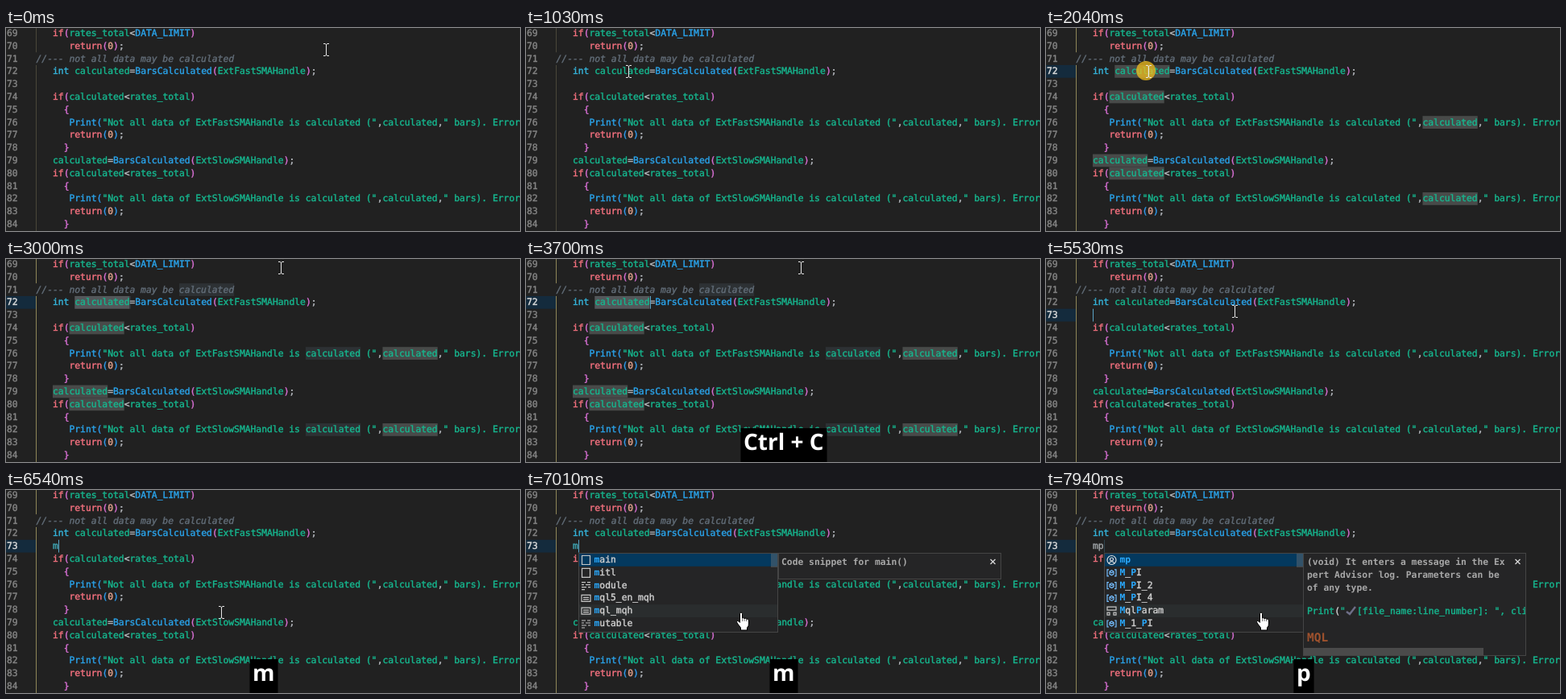
An HTML page with a canvas that plays this animation: 638x252 px, repeating every 8000 ms.

```html
<!DOCTYPE html>
<html lang="en">
<head>
<meta charset="utf-8">
<title>Code editor</title>
<style>
html, body { margin: 0; width: 100%; height: 100%; overflow: hidden; background: #212121; }
canvas { display: block; }
</style>
</head>
<body>
<canvas id="stage" width="638" height="252"></canvas>
<script>
const ctx = document.getElementById('stage').getContext('2d');
const LOOP = 8000, CHAR = 6.825, ROW = 15.8, LEFT = 37.5, FIRST = 69;
const MONO = '11.34px "DejaVu Sans Mono", monospace';
const KEYS = 'bold 28px "Open Sans", sans-serif';
const BLUE = '#2aa3ea', TEAL = '#16b78f', GRAY = '#a8a8a8';
const BRACKETS = ['#ffd700', '#da70d6', '#2f9cf0'];

const source = `   if(rates_total<DATA_LIMIT)
      return(0);
//--- not all data may be calculated
   int calculated=BarsCalculated(ExtFastSMAHandle);

   if(calculated<rates_total)
     {
      Print("Not all data of ExtFastSMAHandle is calculated (",calculated," bars). Error "
      return(0);
     }
   calculated=BarsCalculated(ExtSlowSMAHandle);
   if(calculated<rates_total)
     {
      Print("Not all data of ExtSlowSMAHandle is calculated (",calculated," bars). Error "
      return(0);
     }`.split('\n');

const rules = [
  ['comment', /^\/\//, '#626d78'], ['string', /^"/, TEAL], ['keyword', /^(if|return)$/, '#f4717f'],
  ['type', /^int$/, '#35b5dc'], ['function', /^(BarsCalculated|Print|DATA_LIMIT)$/, BLUE],
  ['number', /^\d/, '#e0a08c'], ['name', /^\w/, TEAL], ['mark', /./, '#b9bdc2']
];

const lines = source.map(text => {
  let depth = 1;
  return [...text.matchAll(/\/\/.*|"[^"]*"|\w+|[^\s]/g)].map(({ 0: word, index: col }) => {
    const [kind, , base] = rules.find(rule => rule[1].test(word));
    let color = base;
    if (/^[({]$/.test(word)) color = BRACKETS[depth++ % 3];
    if (/^[)}]$/.test(word)) color = BRACKETS[Math.max(1, --depth) % 3];
    return { word, col, kind, color };
  });
});
// Statements inside braces sit one bracket level deeper.
[7, 8, 13, 14].forEach(i => lines[i].forEach(token => {
  if (/^[()]$/.test(token.word)) token.color = BRACKETS[2];
}));

const rowTop = i => -1.4 + ROW * i;
const colX = col => LEFT + col * CHAR;
const clamp = v => Math.min(1, Math.max(0, v));
const between = (t, a, b) => t >= a && t < b;

function box(x, y, w, h, fill, border) {
  ctx.fillStyle = fill;
  ctx.fillRect(x, y, w, h);
  if (border) {
    ctx.strokeStyle = border;
    ctx.lineWidth = 1;
    ctx.strokeRect(x + .5, y + .5, w - 1, h - 1);
  }
}

// Regular text gets a thin outline to reach a medium weight.
function label(text, x, y, color, font = MONO) {
  ctx.font = font;
  ctx.fillStyle = ctx.strokeStyle = color;
  ctx.fillText(text, x, y);
  if (font.startsWith('bold')) return;
  ctx.lineWidth = .4;
  ctx.strokeText(text, x, y);
}

function stroke(path, x, y, color, width = 1) {
  ctx.save();
  ctx.translate(x, y);
  ctx.strokeStyle = color;
  ctx.lineWidth = width;
  ctx.stroke(new Path2D(path));
  ctx.restore();
}

// Pointer stops: time, x, y
const stops = [
  [420, 397, 27], [1030, 127, 54], [2480, 127, 54], [2720, 341, 11], [4060, 341, 11],
  [4390, 254, 47], [4640, 234, 65], [5580, 234, 65], [6240, 267, 152]
];

function pointerAt(t) {
  const next = stops.findIndex(s => s[0] > t);
  if (next < 0) return stops[stops.length - 1].slice(1);
  if (next === 0) return stops[0].slice(1);
  const a = stops[next - 1], b = stops[next];
  const u = (t - a[0]) / (b[0] - a[0]), e = u * u * (3 - 2 * u);
  return [a[1] + (b[1] - a[1]) * e, a[2] + (b[2] - a[2]) * e];
}

// Caret moves: time, row, column
const carets = [[1430, 3, 13], [2250, 3, 17], [4930, 4, 3], [6540, 4, 4], [7210, 4, 5]];

function drawCaret(t) {
  const move = carets.filter(c => c[0] <= t).pop();
  if (!move) return;
  const age = t - move[0];
  let alpha = 1;
  if (age > 500) {
    const phase = (age - 500) % 1000, folded = phase < 500 ? phase : 1000 - phase;
    const u = clamp((folded - 100) / 200);
    alpha = 1 - u * u * (3 - 2 * u);
  }
  ctx.globalAlpha = alpha;
  box(Math.round(colX(move[2])), rowTop(move[1]), 1, ROW, '#5aa3c4');
  ctx.globalAlpha = 1;
}

function drawHighlights(t) {
  const symbols = between(t, 1700, 4990), matches = between(t, 2310, 4860);
  const selected = between(t, 2180, 4860);
  lines.forEach((tokens, row) => tokens.forEach(({ word, col, kind }) => {
    const at = word.indexOf('calculated');
    if (at < 0) return;
    const quoted = kind === 'string' || kind === 'comment';
    let fill = quoted ? matches && '#2d3134' : symbols && '#484a49';
    if (row === 3 && selected) fill = '#53575a';
    if (fill) box(colX(col + at), rowTop(row), 10 * CHAR, ROW, fill);
  }));
}

function drawGuide(active) {
  const color = active ? '#8f8658' : '#4a473a';
  box(37, 0, 1, rowTop(2), color);
  box(37, rowTop(3), 1, 252, color);
}

function drawEditor(t) {
  const active = t < 1430 ? -1 : t < 4800 ? 3 : 4;
  box(0, 0, 638, 252, '#212121');
  if (active >= 0) box(0, rowTop(active), 37, ROW, '#142b3d');
  drawGuide(active >= 0);
  drawHighlights(t);
  lines.forEach((tokens, row) => {
    const y = 10 + ROW * row;
    label(FIRST + row, 1, y, row === active ? '#e0e0e0' : '#858585');
    tokens.forEach(({ word, col, color, kind }) =>
      label(word, colX(col), y, color, kind === 'comment' ? 'italic ' + MONO : MONO));
  });
  if (t >= 6540) label(t < 7210 ? 'm' : 'mp', colX(3), 10 + ROW * 4, t < 7210 ? '#3fa7b4' : '#a0a5a8');
  drawCaret(t);
}

const icons = {
  snippet: ['M1.5 .5H11.5V11.5H1.5Z', '#c5c5c5'],
  word: ['M1 2H6M8 2H12M1 5H4M6 5H12M1 8H7M9 8H12M1 11H5', '#c5c5c5'],
  text: ['M1 2H12V10H1ZM3 5H10M3 7.5H10', '#c5c5c5'],
  user: ['M12 6A5.5 5.5 0 1 1 1 6A5.5 5.5 0 1 1 12 6M8.5 5A2 2 0 1 1 4.5 5A2 2 0 1 1 8.5 5M3 10Q6.5 5.5 10 10', '#e0e0e0'],
  constant: ['M3 2H1V10H3M10 2H12V10H10M4 4.5L6.5 3L9 4.5V7.5L6.5 9L4 7.5ZM4 4.5L6.5 6L9 4.5', '#75beff'],
  struct: ['M1 1H12V5H1ZM1 8H4V11H1ZM9 8H12V11H9Z', '#c5c5c5']
};
const listM = [['snippet', 'main'], ['snippet', 'mitl'], ['word', 'module'],
  ['text', 'mql5_en_mqh'], ['text', 'mql_mqh'], ['word', 'mutable']];
const listMp = [['user', 'mp'], ['constant', 'M_PI'], ['constant', 'M_PI_2'],
  ['constant', 'M_PI_4'], ['struct', 'MqlParam'], ['constant', 'M_1_PI']];

function drawList(x, items, typed) {
  box(x, 78, 248, 99, '#252526', '#454545');
  items.forEach(([icon, name], i) => {
    const y = 79 + ROW * i;
    if (i === 0) box(x + 1, y, 246, ROW, '#04395e');
    if (i === 4) box(x + 1, y, 246, ROW, '#2a2d2e');
    stroke(icons[icon][0], x + 3, y + 2, icons[icon][1], 1.2);
    let hit = 0;
    [...name].forEach((c, k) => {
      const match = c.toLowerCase() === typed[hit];
      if (match) hit++;
      label(c, x + 19.5 + k * CHAR, y + 11, match ? '#2aaaff' : '#d0d0d0', match ? 'bold ' + MONO : MONO);
    });
  });
  box(x + 239, 79, 8, 17, 'rgba(121, 121, 121, .4)');
}

function drawDetails(x, height) {
  box(x, 78, 277, height, '#252526', '#454545');
  stroke('M-3 -3L3 3M3 -3L-3 3', x + 266.5, 89, '#d8d8d8', 1.3);
}

function drawSuggestions(t) {
  if (t < 6610) return;
  if (t < 7270) {
    drawList(65, listM, 'm');
    if (t >= 7010) {
      drawDetails(313, 33);
      label('Code snippet for main()', 317, 93, GRAY, 'bold ' + MONO);
    }
    return;
  }
  drawList(72, listMp, 'mp');
  if (t < 7340) return;
  drawDetails(319, 128);
  ['(void) It enters a message in the Ex', 'pert Advisor log. Parameters can be', 'of any type.']
    .forEach((text, i) => label(text, 324, 93 + ROW * i, GRAY, 'bold ' + MONO));
  ctx.save();
  ctx.beginPath();
  ctx.rect(320, 79, 275, 126);
  ctx.clip();
  label('Print', 324, 154, TEAL);
  label('(', 324 + 5 * CHAR, 154, '#d0d0d0');
  label('"', 324 + 6 * CHAR, 154, TEAL);
  stroke('M0 4L4 7L11 -2', 373, 147, '#6f6f88', 2.4);
  label('[file_name:line_number]: ", client', 386, 154, TEAL);
  label('MQL', 324, 188, '#a0522d', 'bold 14.5px "DejaVu Sans Mono", monospace');
  ctx.restore();
  box(320, 196, 223, 9, '#4a4a4a');
}

function drawKeys(t) {
  const keys = between(t, 3210, 4200) ? ['Ctrl + C']
    : between(t, 6540, 7210) ? ['m'] : between(t, 7210, 7540) ? ['m', 'p'] : t >= 7540 ? ['p'] : [];
  ctx.font = KEYS;
  const widths = keys.map(key => ctx.measureText(key).width + 7.5);
  let x = 320 - (widths.reduce((a, b) => a + b, 0) + 9 * (keys.length - 1)) / 2;
  keys.forEach((key, i) => {
    box(x, 210, widths[i], 42, '#000');
    label(key, x + 3.5, 237, '#fff', KEYS);
    x += widths[i] + 9;
  });
}

const beam = 'M-3.5 -7.5H-1.5L0 -6.5L1.5 -7.5H3.5M0 -6.5V6.5M-3.5 7.5H-1.5L0 6.5L1.5 7.5H3.5';
const hand = new Path2D('M4 1.5Q4 0 5.5 0Q7 0 7 1.5V7Q8 6 9.5 7.5Q11 6.5 12 8.3Q14.5 7.5 15 10V14Q15 17 13 19V22H5V19L.5 13Q-.5 11 1 10.5Q2.5 10.5 4 12.5Z');
const clicks = [[1430, 1500], [2040, 2110], [2180, 2250], [4730, 4800]];

function drawPointer(t) {
  const [x, y] = pointerAt(t);
  if (clicks.some(([a, b]) => between(t, a, b))) {
    ctx.fillStyle = 'rgba(240, 190, 30, .75)';
    ctx.beginPath();
    ctx.arc(x - 3, y - 1, 12, 0, 7);
    ctx.fill();
  }
  if (t < 6610) {
    stroke(beam, Math.floor(x) + .5, Math.round(y), '#e8e8e8');
    return;
  }
  ctx.save();
  ctx.translate(261.5, 152);
  ctx.fillStyle = '#fff';
  ctx.strokeStyle = '#000';
  ctx.lineWidth = 1;
  ctx.fill(hand);
  ctx.stroke(hand);
  ctx.restore();
  stroke('M7 7V11M9.5 8V11M12 9V11', 261.5, 152, '#333', .7);
}

function frame(now) {
  const t = now % LOOP;
  ctx.textRendering = 'geometricPrecision';
  drawEditor(t);
  drawSuggestions(t);
  drawKeys(t);
  drawPointer(t);
  requestAnimationFrame(frame);
}
requestAnimationFrame(frame);
</script>
</body>
</html>
```
